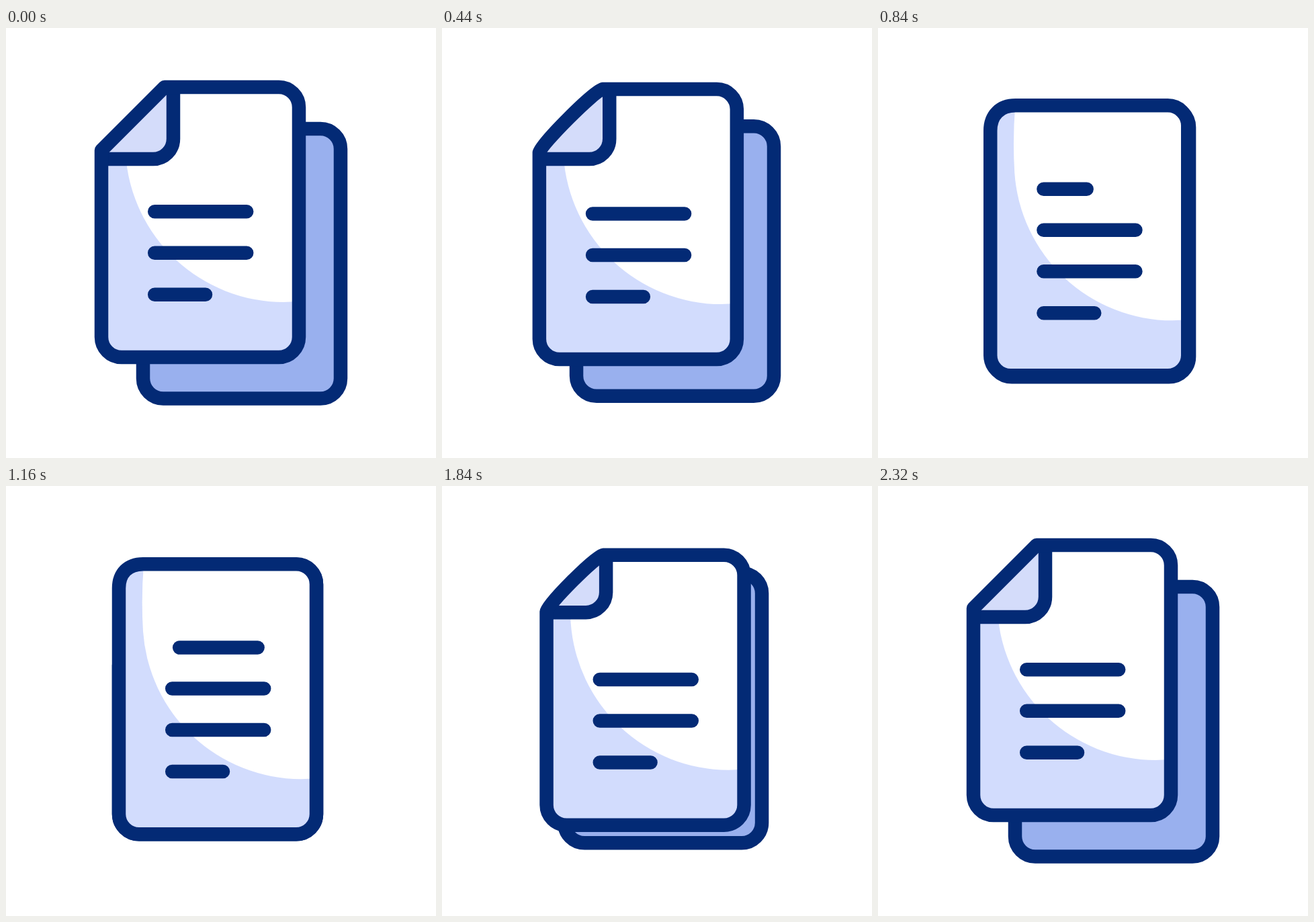
An HTML page for the animation above (2400 ms loop, 640 by 640 pixels).

```html
<!DOCTYPE html>
<html lang="en">
<head>
<meta charset="utf-8">
<title>Documents</title>
<style>
  html, body { margin: 0; width: 100%; height: 100%; overflow: hidden; background: #fff; }
  svg { display: block; width: 100%; height: 100%; }
  .ink { fill: none; stroke: #032a75; stroke-width: 20.5; stroke-linecap: round; stroke-linejoin: round; }
</style>
</head>
<body>
<svg viewBox="0 0 640 640">
  <defs><clipPath id="clip"><path id="clipPage"/></clipPath></defs>
  <g id="back">
    <path class="ink" style="fill:#99b0ee"
      d="M300 150H468A30 30 0 0 1 498 180V521.5A30 30 0 0 1 468 551.5H234A30 30 0 0 1 204 521.5V300"/>
  </g>
  <g id="front">
    <path id="page" fill="#d2dcfd"/>
    <g clip-path="url(#clip)">
      <path fill="#fff" d="M179 88Q175 138 178 188A236 236 0 0 0 413 408L436 407V88Z"/>
      <path id="fold" class="ink" style="fill:#d4dcfa"/>
    </g>
    <path id="outline" class="ink"/>
    <path class="ink" d="M221.2 273.3H358.2M221.2 334.8H358.2M221.2 396.8H297"/>
    <path id="extra" class="ink"/>
  </g>
</svg>
<script>
const LOOP = 2400, STEP = 40;
const LEFT = 142, TOP = 88, FOLD = 107;
const $ = id => document.getElementById(id);
const [back, front, page, clipPage, fold, outline, extra] =
  ['back', 'front', 'page', 'clipPage', 'fold', 'outline', 'extra'].map($);

const mix = (a, b, f) => a + (b - a) * f;

// Eased progress from 0 to 1; the curve has control points (x1, 0) and (x2, 1).
function ease(time, start, length, x1, x2) {
  const x = Math.min(1, Math.max(0, (time - start) / length));
  if (x === 0 || x === 1) return x;
  let lo = 0, hi = 1, u = .5;
  for (let i = 0; i < 24; i++) {
    const v = 1 - u;
    if (3 * x1 * v * v * u + 3 * x2 * v * u * u + u * u * u < x) lo = u;
    else hi = u;
    u = (lo + hi) / 2;
  }
  return u * u * (3 - 2 * u);
}

function pagePath(round, size) {
  const x = LEFT + size, y = TOP + size, h = size * (1 - round);
  return `M${LEFT} ${y}C${LEFT} ${TOP + h} ${LEFT + h} ${TOP} ${x} ${TOP}` +
    'H406A30 30 0 0 1 436 118V460A30 30 0 0 1 406 490H172A30 30 0 0 1 142 460Z';
}

function foldPath(size) {
  const h = Math.max(0, size - (FOLD - size) * .17);
  const r = Math.min(30, h), x = LEFT + size, y = TOP + h;
  return `M${LEFT} ${TOP}H${x}V${y - r}A${r} ${r} 0 0 1 ${x - r} ${y}H${LEFT}Z`;
}

function draw(time) {
  // The sheets slide together, then apart.
  const join = ease(time, 240, 760, .6, .2);
  const p = join - ease(time, 1550, 693, .6, .2);
  const q = join - ease(time, 1550, 738, .6, .2);
  front.setAttribute('transform', `translate(${26 * p} ${28.2 * p})`);
  back.setAttribute('transform', `translate(${-36 * q} ${-33.3 * q})`);

  // The cut corner bulges, shrinks and loses its fold, then all of it reopens.
  const reopen = ease(time, 1520, 570, .5, .2);
  const bulge = ease(time, 360, 290, .4, .6) - reopen;
  const shrink = ease(time, 600, 270, .4, .6) - reopen;
  const foldSize = FOLD * (1 - ease(time, 365, 460, .6, 1) + reopen);
  const d = pagePath(.62 * bulge, mix(94, 36, shrink));
  for (const el of [page, clipPage, outline]) el.setAttribute('d', d);
  fold.setAttribute('d', foldPath(foldSize));
  fold.style.display = foldSize > 1 ? '' : 'none';

  // The extra line is written and then wiped from the left.
  const head = ease(time, 460, 800, .2, .8);
  const tail = ease(time, 1085, 550, .2, .8);
  extra.style.display = head > tail ? '' : 'none';
  extra.setAttribute('d', `M${mix(221.2, 358.2, tail)} 212.3H${mix(221.2, 358.2, head)}`);
}

const begin = performance.now();
function tick() {
  const time = (performance.now() - begin) % LOOP;
  draw(Math.floor(time / STEP) * STEP);
  requestAnimationFrame(tick);
}
tick();
</script>
</body>
</html>
```
